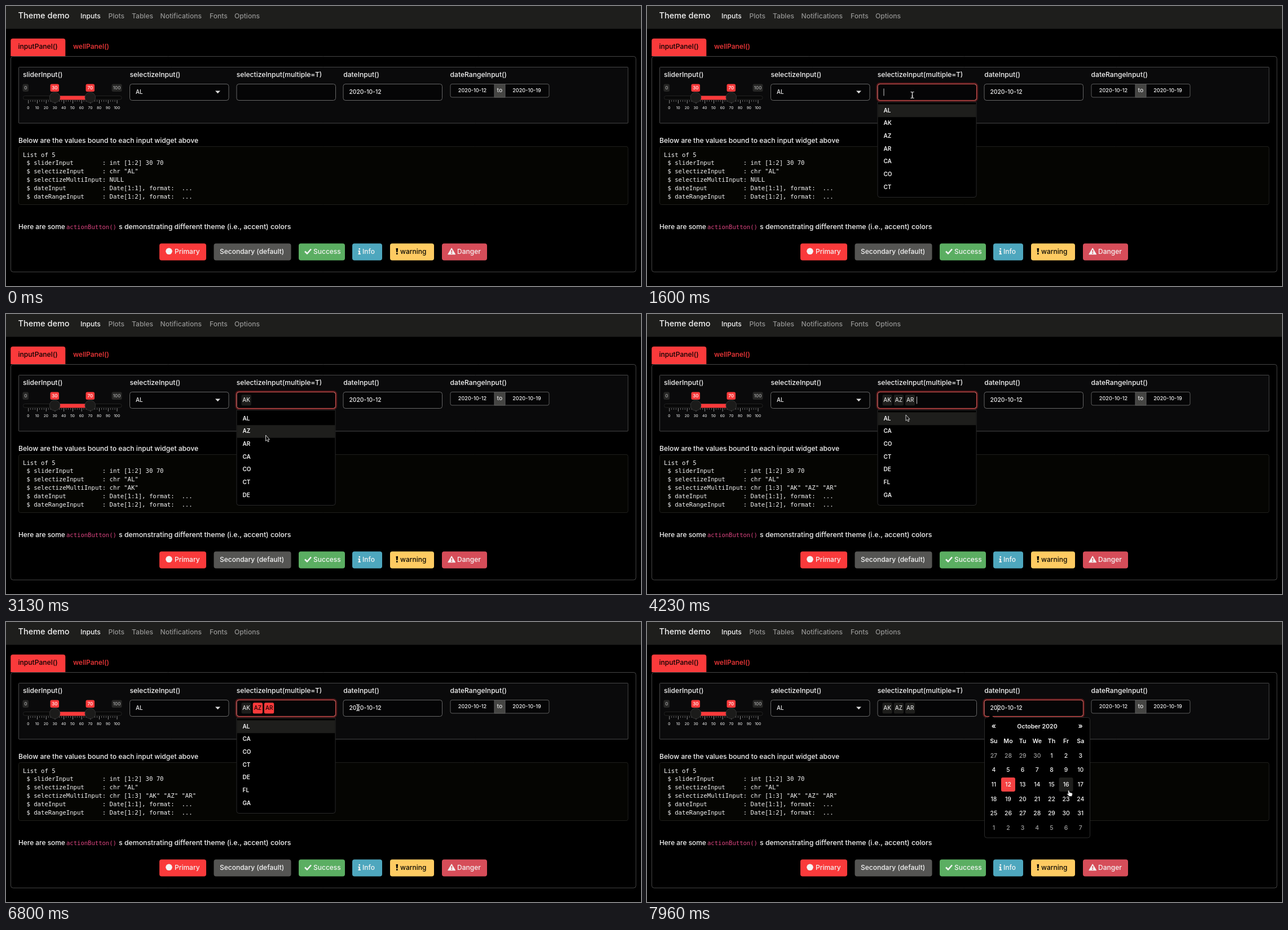
An HTML page with a canvas that plays this animation: 1126x497 px, repeating every 8000 ms.

```html
<!DOCTYPE html>
<html lang="en">
<head>
<meta charset="utf-8">
<title>Theme demo</title>
<style>
  html, body { margin: 0; width: 100%; height: 100%; overflow: hidden; background: #000; }
  canvas { display: block; }
</style>
</head>
<body>
<canvas id="stage" width="1126" height="497"></canvas>
<script>
const ctx = document.getElementById('stage').getContext('2d');
const LOOP = 8000;
const RED = '#fa3a3b', WHITE = '#f4f4f4', DARK = '#1e1e1c', EDGE = '#5c5c5c';
const SANS = 'Inter, "Open Sans", sans-serif';
const MONO = '"DejaVu Sans Mono", monospace';

// ---- helpers ----
function text(str, x, y, { size = 12.1, color = WHITE, weight = 500, align = 'left', family = SANS } = {}) {
  ctx.font = `${weight} ${size}px ${family}`;
  ctx.fillStyle = color;
  ctx.textAlign = align;
  ctx.fillText(str, x, y);
}

function box(x, y, w, h, { r = 4, fill, stroke, line = 1 } = {}) {
  ctx.beginPath();
  ctx.roundRect(x, y, w, h, r);
  if (fill) { ctx.fillStyle = fill; ctx.fill(); }
  if (stroke) { ctx.strokeStyle = stroke; ctx.lineWidth = line; ctx.stroke(); }
}

function circle(x, y, r, fill, stroke) {
  box(x - r, y - r, 2 * r, 2 * r, { r, fill, stroke });
}

function shape(path, x, y, { fill, stroke, line = 1 }) {
  const p = new Path2D(path);
  ctx.save();
  ctx.translate(x, y);
  if (fill) { ctx.fillStyle = fill; ctx.fill(p); }
  if (stroke) { ctx.strokeStyle = stroke; ctx.lineWidth = line; ctx.lineJoin = 'round'; ctx.stroke(p); }
  ctx.restore();
}

const ramp = (t, from, length) => Math.min(1, Math.max(0, (t - from) / length));
const within = (t, spans) => spans.some(([a, b]) => t >= a && t < b);
const countPassed = (t, times) => times.filter(at => t >= at).length;

// ---- timeline ----
const OPEN_LIST = 1330, OPEN_CALENDAR = 6830;
const PICKED = ['AK', 'AZ', 'AR'];
const PICK_TIMES = [2430, 3200, 3860];
const PRINT_TIMES = [2500, 3230, 3900];
const MARK_TIMES = { AZ: 4600, AR: 5500 };
const STATES = ['AL', 'AK', 'AZ', 'AR', 'CA', 'CO', 'CT', 'DE', 'FL', 'GA'];
const LIST_CARET = [[1330, 1900], [2430, 2930], [3430, 4400]];
const DATE_CARET = [[6830, 7330], [7830, LOOP]];

const POINTER = [
  [600, 403, 440], [730, 443.5, 251], [960, 443.5, 251], [1100, 470, 163],
  [1300, 470, 163], [1430, 470.5, 158], [1900, 470.5, 158], [2160, 463, 207],
  [2330, 463, 207], [2530, 463.5, 210], [2860, 463.5, 210], [3100, 460.5, 215],
  [4160, 460.5, 215], [4230, 459, 179], [4400, 455, 165], [4600, 450, 157],
  [5100, 450, 157], [5450, 469, 157], [6160, 469, 157], [6330, 605, 146],
  [6530, 605, 146], [6660, 624, 152], [7330, 624, 152], [7600, 748, 303],
  [7830, 748, 303], [7960, 749.5, 304]
];
const POINTER_KINDS = [
  [600, arrow], [1080, beam], [1950, arrow], [4380, hand],
  [6200, beam], [7370, arrow], [7440, hand]
];

function pointerAt(t) {
  const next = POINTER.findIndex(p => p[0] > t);
  if (next < 0) return POINTER.at(-1).slice(1);
  const [t0, x0, y0] = POINTER[next - 1], [t1, x1, y1] = POINTER[next];
  const k = (t - t0) / (t1 - t0), ease = k * k * (3 - 2 * k);
  return [x0 + (x1 - x0) * ease, y0 + (y1 - y0) * ease];
}

function arrow(x, y) {
  shape('M0 0V10.5L2.4 8.4L4 12L5.7 11.2L4.2 7.8H7Z', x, y, { fill: '#111', stroke: '#ddd', line: 0.9 });
}

function beam(x, y) {
  const path = 'M-3 -5.5Q0 -5.5 0 -4Q0 -5.5 3 -5.5M0 -4V4M-3 5.5Q0 5.5 0 4Q0 5.5 3 5.5M-1.5 2H1.5';
  shape(path, x, y, { stroke: '#111', line: 2.6 });
  shape(path, x, y, { stroke: '#ddd', line: 1.2 });
}

function hand(x, y) {
  const path = 'M-3 -4.5Q-2 -6 -1 -4.5L0 -1.5L4 -.6Q5.2 0 4.8 2L4 5.5H-1L-4.8 1.2Q-4.5 -.2 -2.5 1Z';
  shape(path, x, y, { fill: '#f5f5f5', stroke: '#222', line: 0.8 });
}

// ---- page ----
function header() {
  box(0, 0, 1126, 40.5, { r: 0, fill: DARK });
  text('Theme demo', 21.5, 22, { size: 14.5 });
  text('Inputs', 132, 21.5);
  [['Plots', 181.5], ['Tables', 223], ['Notifications', 273.5], ['Fonts', 361], ['Options', 405]]
    .forEach(([name, x]) => text(name, x, 21.5, { color: '#949493' }));
}

function panels() {
  box(8.5, 89.5, 1108.5, 382.5, { stroke: '#454545' });
  box(8.3, 57.8, 97, 31.2, { r: [4, 4, 0, 0], fill: RED });
  text('inputPanel()', 21.5, 76, { color: '#0a0000' });
  text('wellPanel()', 119, 76, { color: RED });
  box(22.5, 108.5, 1080.5, 99.5, { r: 1, fill: '#0a0a0b', stroke: '#484848' });
  ['sliderInput()', 'selectizeInput()', 'selectizeInput(multiple=T)', 'dateInput()', 'dateRangeInput()']
    .forEach((label, i) => text(label, 30 + 189.4 * i, 126));
}

function slider() {
  const tag = (str, x, w, fill, color) => {
    box(x, 138.5, w, 13.5, { r: 2.5, fill });
    text(str, x + w / 2, 148, { size: 8, align: 'center', color });
  };
  box(30.5, 159.5, 174.5, 6.5, { r: 3, fill: '#080808', stroke: '#222' });
  box(86, 159.5, 63, 7, { r: 0, fill: RED });
  for (let i = 0; i <= 40; i++) {
    const x = 39.4 + i * 3.93, major = i % 4 === 0;
    box(x, 167, 0.8, major ? 6 : 3, { r: 0, fill: major ? '#aaa' : '#777' });
    if (major) text(String(i * 2.5), x, 182.5, { size: 6.4, align: 'center', color: '#ddd' });
  }
  tag('0', 29.5, 10.5, '#262625', '#aaa');
  tag('100', 187.5, 18, '#262625', '#aaa');
  tag('30', 78.5, 15.5, RED, '#fff');
  tag('70', 141.5, 15.5, RED, '#fff');
  circle(86.5, 162.3, 9.3, '#1b1b1a', '#333');
  circle(149.3, 162.3, 9.3, '#1b1b1a', '#333');
}

function field(x, focus = 0) {
  box(x, 138.5, 175.5, 29, { fill: '#050506', stroke: '#666' });
  ctx.globalAlpha = focus;
  box(x - 1.5, 137, 178.5, 32, { r: 5.5, stroke: 'rgba(250,58,59,.27)', line: 2.4 });
  box(x, 138.5, 175.5, 29, { stroke: '#de5b57' });
  ctx.globalAlpha = 1;
}

const caret = x => box(x, 146.5, 1, 13, { r: 0, fill: '#ccc' });

function dateFields(dateFocus) {
  field(219.5);
  text('AL', 230, 156, { size: 9.8 });
  shape('M0 0H9L4.5 4.8Z', 371, 150.5, { fill: '#ddd' });
  field(598, dateFocus);
  text('2020-10-12', 608.5, 155.6, { size: 10.3 });
  box(788, 138.5, 175, 23.5, { r: 3, fill: '#050506', stroke: EDGE });
  box(866, 138.5, 19, 23.5, { r: 0, fill: '#454543', stroke: EDGE });
  text('2020-10-12', 827, 153, { size: 9.1, align: 'center' });
  text('2020-10-19', 923.5, 153, { size: 9.1, align: 'center' });
  text('to', 875.5, 153, { size: 10.5, align: 'center', color: '#ddd' });
}

function printout(t) {
  const shown = PICKED.slice(0, countPassed(t, PRINT_TIMES));
  const range = shown.length > 1 ? `[1:${shown.length}] ` : '';
  const multi = shown.length ? `chr ${range}${shown.map(s => `"${s}"`).join(' ')}` : 'NULL';
  const rows = [
    ['sliderInput', 'int [1:2] 30 70'], ['selectizeInput', 'chr "AL"'], ['selectizeMultiInput', multi],
    ['dateInput', 'Date[1:1], format:  ...'], ['dateRangeInput', 'Date[1:2], format:  ...']
  ].map(([name, value]) => ` $ ${name.padEnd(19)}: ${value}`);
  text('Below are the values bound to each input widget above', 22, 243);
  box(22.5, 249.5, 1080.5, 103, { r: 3, fill: '#050502', stroke: '#1f1f1c' });
  ['List of 5', ...rows].forEach((row, i) =>
    text(row, 30, 267.5 + 14.82 * i, { size: 10.63, weight: 400, family: MONO }));
}

function buttons() {
  text('Here are some', 22, 395.5, { size: 11.9 });
  text('actionButton()', 107, 395.5, { size: 10.55, weight: 400, family: MONO, color: '#dc4580' });
  text('s demonstrating different theme (i.e., accent) colors', 200, 395.5, { size: 12.3 });
  [
    ['Primary', 272, 83, 299, RED],
    ['Secondary (default)', 368.5, 137, 379, '#555553'],
    ['Success', 519, 82, 545, '#5bae62'],
    ['Info', 614, 53, 632, '#4ea7be'],
    ['warning', 681, 78, 699, '#fecb62', '#0c0a04'],
    ['Danger', 773, 80, 800, '#d64d59']
  ].forEach(([label, x, w, textX, fill, color]) => {
    box(x, 421.5, w, 30, { fill });
    text(label, textX, 439.5, { color, size: 12 });
  });
  circle(289, 435.3, 5.8, WHITE);
  shape('M0 4L4 8L11 0', 530, 431.5, { stroke: WHITE, line: 2.5 });
  shape('M0 4H3.3V9.2H4.5V11H0V9.2H1V5.8H0ZM1 0H3.5V2.5H1Z', 624.5, 430, { fill: WHITE });
  shape('M0 0H3.6L3 7H.6ZM.5 8.3H3.1V11H.5Z', 691.5, 430, { fill: '#0c0a04' });
  shape('M6.5 .5L13 11.5H0Z', 783.7, 429.3, { fill: WHITE, stroke: WHITE });
  shape('M6 4H7.2V7.5H6ZM6 8.8H7.2V10.2H6Z', 783.7, 429.3, { fill: '#d64d59', stroke: '#d64d59', line: 0.5 });
}

function multiSelect(t) {
  const open = t >= OPEN_LIST && t < OPEN_CALENDAR;
  const picked = PICKED.slice(0, countPassed(t, PICK_TIMES));
  field(409, ramp(t, OPEN_LIST, 150) * (1 - ramp(t, OPEN_CALENDAR, 150)));
  picked.forEach((name, i) => {
    const x = 417.5 + 20.2 * i, marked = open && t >= MARK_TIMES[name];
    box(x, 143.3, 17.3, 19.2, { r: 2.5, fill: marked ? RED : DARK });
    text(name, x + 8.7, 155.7, { size: 9.8, align: 'center', color: marked ? '#160000' : '#dcdcdc' });
  });
  if (within(t, LIST_CARET)) caret([419.5, 437, 457.5, 478][picked.length]);
  if (!open) return;
  box(409, 170.5, 175, 169, { r: [0, 0, 4, 4], fill: '#000', stroke: '#292929' });
  const active = t >= 2080 && t < 4200 ? 1 : 0;
  box(409.5, 174.5 + 22.65 * active, 174, 22.65, { r: 0, fill: DARK });
  STATES.filter(s => !picked.includes(s)).slice(0, 7)
    .forEach((s, i) => text(s, 419.5, 188.7 + 22.65 * i, { size: 10, weight: 600 }));
}

function calendar(t, [px, py]) {
  const left = 602, top = 224.5, cell = 25.65;
  const center = col => left + cell * (col + 0.5);
  const put = (str, x, y, size = 10.6) => text(str, x, y, { size, align: 'center', weight: 600 });
  box(598.5, 169.5, 187, 213.5, { fill: '#000', stroke: '#2b2b2b' });
  shape('M0 6L5.5 0L11 6Z', 604.5, 164.5, { fill: '#000' });
  put('«', center(0), 189, 13);
  put('October 2020', 692, 189);
  put('»', center(6), 189, 13);
  ['Su', 'Mo', 'Tu', 'We', 'Th', 'Fr', 'Sa'].forEach((d, i) => put(d, center(i), 215));
  const hoverCol = Math.floor((px - 2 - left) / cell);
  const hoverRow = Math.floor((py - 5 - top) / cell);
  for (let i = 0; i < 42; i++) {
    const col = i % 7, row = Math.floor(i / 7);
    const date = new Date(2020, 8, 27 + i), inMonth = date.getMonth() === 9;
    const selected = inMonth && date.getDate() === 12;
    const hovered = col === hoverCol && row === hoverRow;
    if (selected || hovered)
      box(left + cell * col + 0.3, top + cell * row + 0.3, 25, 25, { r: 3, fill: selected ? '#f54142' : DARK });
    text(String(date.getDate()), center(col), top + cell * row + 16.3,
      { size: 10.4, align: 'center', color: inMonth ? WHITE : '#a0a0a0' });
  }
  if (within(t, DATE_CARET)) caret(621.5);
}

const start = performance.now();
function draw() {
  const t = (performance.now() - start) % LOOP;
  const pointer = t >= 600 ? pointerAt(t) : null;
  ctx.fillStyle = '#000';
  ctx.fillRect(0, 0, 1126, 497);
  header();
  panels();
  slider();
  dateFields(ramp(t, OPEN_CALENDAR, 150));
  printout(t);
  buttons();
  multiSelect(t);
  if (t >= OPEN_CALENDAR) calendar(t, pointer);
  if (pointer) POINTER_KINDS.findLast(([at]) => t >= at)[1](...pointer);
  requestAnimationFrame(draw);
}
draw();
</script>
</body>
</html>
```
